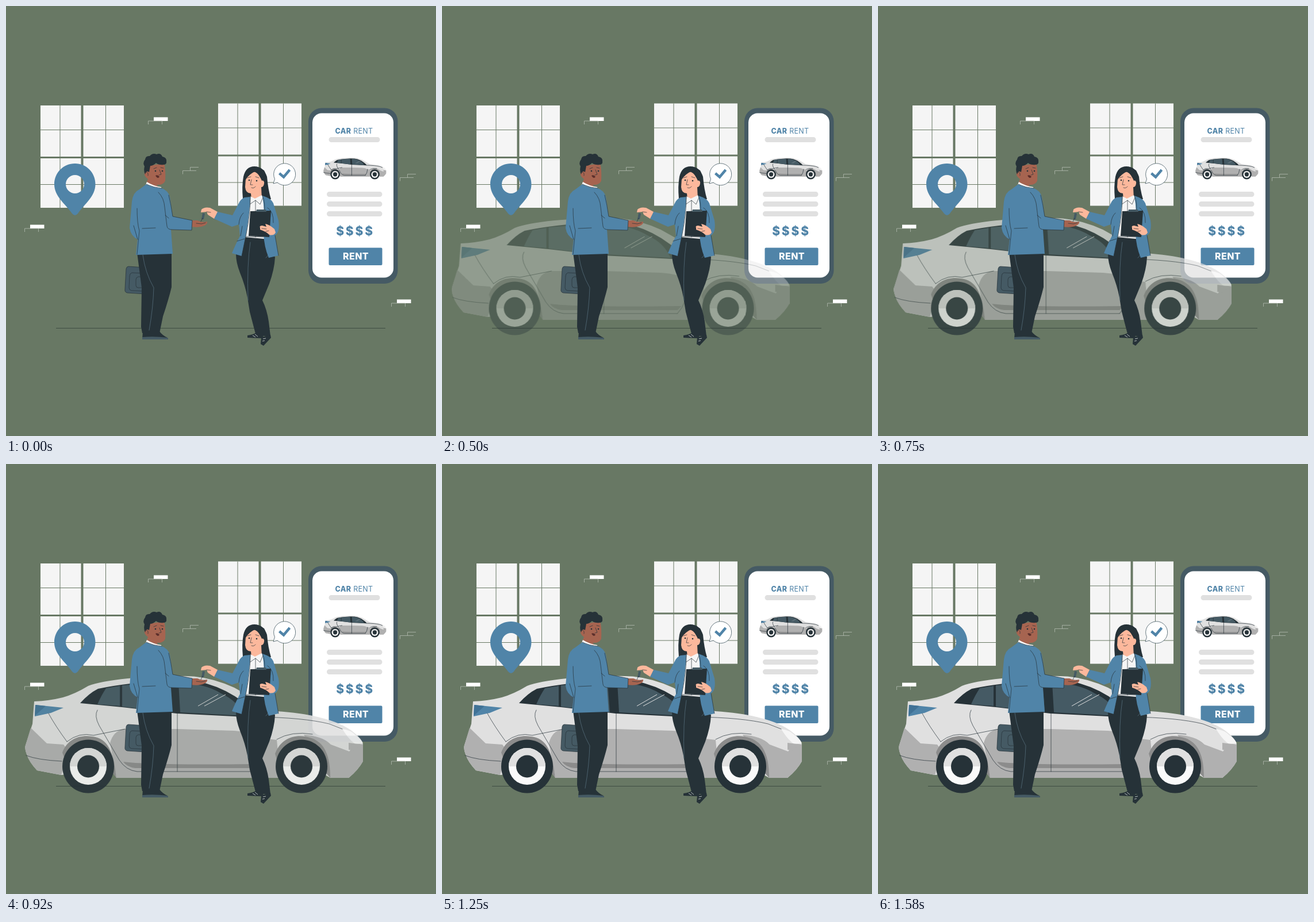
An HTML page without scripts that plays this animation: 748x748 px, repeating every 1.62 s.

```html
<!DOCTYPE html>
<html lang="en">
<head>
<meta charset="utf-8">
<title>Car rent</title>
<style>
  html, body { margin: 0; width: 100%; height: 100%; overflow: hidden; background: #687864; }
  svg { display: block; width: 100vw; height: 100vh; }
  .blue { fill: #5084a8; }
  .dark { fill: #263238; }
  .slate { fill: #455a64; }
  .white { fill: #fff; }
  .pale { fill: #e0e0e0; }
  .grey { fill: #b0b0b0; }
  .trim { fill: #8c8c8c; }
  .brown { fill: #a66450; }
  .peach { fill: #fcb89c; }
  .seam { fill: none; stroke: #263238; stroke-width: .7; stroke-linecap: round; stroke-linejoin: round; vector-effect: non-scaling-stroke; }
  .fold { stroke: #5b7583; }
  .brick { fill: none; stroke: #b3bcb0; stroke-width: .8; }
  text { font-family: Inter, "Open Sans", sans-serif; text-anchor: middle; }
  .bold { font-weight: 800; }

  .drive { animation: drive 1620ms infinite; }
  @keyframes drive {
    0%, 1.85% {
      opacity: 0;
      transform: translateX(-30px);
      animation-timing-function: cubic-bezier(.36, -.01, .5, 1.38);
    }
    94.44%, 100% { opacity: 1; transform: none; }
  }
</style>
</head>
<body>
<svg viewBox="0 0 748 748">
  <defs>
    <g id="window">
      <path fill="#f5f5f5" d="M60 173H130.500V262H60ZM134.500 173H205V262H134.500ZM60 265H130.500V351H60ZM134.500 265H205V351H134.500Z"/>
      <path fill="none" stroke="#687864" d="M94 173V351M173.500 173V351M60 215.500H205M60 310.500H205"/>
    </g>

    <g id="brick">
      <path class="white" d="M10 0H34.500V6.500H10Z"/>
      <path class="brick" d="M.5 12.500V6.500H24.500V12.500"/>
    </g>
    <path id="outline-brick" class="brick" d="M.5 12.500V6.500H24M13.500 6.500V.5H28"/>

    <g id="wheel">
      <ellipse class="dark" rx="45" ry="46.500"/>
      <circle r="32" fill="#fafafa"/>
      <path class="pale" d="M-32 0A32 32 0 0 1 32 0Z"/>
      <ellipse class="dark" rx="19" ry="19.500"/>
    </g>

    <g id="car">
      <path class="pale" d="M52 413Q78 412 102 406Q123 400 146 386Q166 378 215 373Q290 367 330 369.500Q365 373 400 389L473 430Q517 433 545 440Q588 450 608 467Q622 478 624 488V517Q616 532 599 546H567L540 530L474 546H195L185 530L99 541L57 533Q43 518 39 505Q35 495 37 489L49 452Z"/>
      <path class="grey" d="M46 459L74 486L103 488L112 500L99 541L57 533Q43 518 39 505Q35 495 37 489Z"/>
      <path class="grey" d="M184 485Q190 464 208 461H300L400 464Q431 466 449 477L474 480L480 546H195Z"/>
      <path class="grey" d="M521 471Q553 473 568 488L600 500L612 486L624 488V517Q616 532 599 546H567Z"/>
      <path fill="#f5f5f5" d="M588 461Q602 462 613 473Q622 480 624 486L611 487Q601 482 588 461Z"/>
      <path class="grey" d="M599 485L615 487L613 500L599 497Z"/>

      <path class="trim" d="M101 502C111 474 139 469 162 476C186 484 191 514 195 546L180 527H110Z"/>
      <path class="trim" d="M471 504C482 474 511 468 535 477C561 487 567 515 567 546L550 527H478Z"/>
      <path class="trim" d="M207 518Q250 524 430 522L436 522L429 529H228Q213 527 207 518Z"/>

      <path class="dark" d="M132 416Q147 399 163 391Q215 380 292 376Q333 376 352 382Q387 392 417 415Q441 431 440 441L300 434L205 423Z"/>
      <path class="slate" d="M162 418Q169 402 177 390L201 386V421ZM205 385L286 379L290 432L205 422ZM303 381Q348 381 377 399Q406 412 417 438L306 432Z"/>
      <path fill="none" stroke="#e0e0e0" d="M337 421L372 401M348 421L385 401"/>

      <path class="blue" d="M54 419L103 424L81 433L53 439Z"/>
      <path fill="#407296" d="M54 419L72 421L53 438Z"/>

      <path class="seam" d="M77 434Q89 456 109 483M38 507Q58 515 100 517M162 428Q156 438 165 455L200 515Q212 533 231 535H429M301 434V535M450 477Q447 516 429 535M109 483Q130 466 155 472L210 461M440 440Q520 441 565 452L588 461M474 479Q500 464 536 470"/>
      <use href="#wheel" x="146" y="526"/>
      <use href="#wheel" x="517" y="526"/>
    </g>
  </defs>

  <rect width="748" height="748" fill="#687864"/>

  <use href="#window"/>
  <use href="#window" x="309" y="-3.500"/>
  <use href="#brick" x="247" y="193.500"/>
  <use href="#brick" x="32" y="380.500"/>
  <use href="#brick" x="670" y="510.500"/>
  <use href="#outline-brick" x="307" y="280"/>
  <use href="#outline-brick" x="685" y="292"/>
  <path stroke="#35443c" stroke-width=".8" d="M87 560.500H660"/>

  <path class="blue" fill-rule="evenodd" d="M120 274C140 274 155.500 290 155.500 310C155.500 331 137 344 125 361Q120 367 115 361C103 344 84 331 84 310C84 290 100 274 120 274ZM120 294A16 16 0 1 0 120 326A16 16 0 1 0 120 294Z"/>

  <g id="phone">
    <rect class="slate" x="526" y="177.500" width="155.500" height="305.500" rx="23"/>
    <rect class="white" x="533" y="186.500" width="141" height="286" rx="16"/>
    <text class="blue" x="605.500" y="222" font-size="12.500" letter-spacing=".3"><tspan class="bold">CAR</tspan> RENT</text>
    <path stroke="#e0e0e0" stroke-width="9" stroke-linecap="round" d="M566 232.500H646M562.500 327.500H650M562.500 344.500H650M562.500 361.500H650"/>
    <use href="#car" transform="translate(545.500 195.400) scale(.1855)"/>
    <text class="blue bold" x="607.500" y="398.500" font-size="21" letter-spacing="2.800">$$$$</text>
    <rect class="blue" x="561.500" y="420.500" width="93" height="30.500" rx="2"/>
    <text class="white bold" x="608.500" y="440.500" font-size="16" letter-spacing=".4">RENT</text>
  </g>

  <g id="bubble">
    <path class="white" stroke="#455a64" stroke-width=".8" d="M465 309L467.500 301A19 19 0 1 1 472 307Z"/>
    <path fill="none" stroke="#5084a8" stroke-width="4.500" d="M475.500 291L483 297.500L493.500 285"/>
  </g>

  <g class="drive"><use href="#car"/></g>

  <g id="man">
    <path class="slate" stroke="#263238" stroke-width=".7" d="M213 453L242 455V501L211 499Q206 498 207 492L209 457Q210 453 213 453Z"/>
    <path class="seam" d="M240 465L219 464Q215 465 215 470L214 490Q214 494 218 495L240 496M240 471H230Q226 472 226 476V486Q226 490 230 490H240"/>

    <path class="dark" d="M228 429H288V489Q283 510 273 540L267 569H237L235 558L236 490Z"/>
    <path class="seam fold" d="M238 433Q242 464 257 490Q256 525 249 564"/>
    <path class="dark" d="M238 566H267Q272 573 281 577L282 580H237Z"/>
    <path class="slate" d="M237 576Q258 574 281 577L282 580H237Z"/>

    <path class="brown" d="M246 278L275 274Q278 284 277 304Q274 312 262 311L270 320L243 311L247 301Q239 296 241 288Z"/>
    <path class="dark" d="M242 293Q239 287 241 279Q237 273 242 267Q243 260 250 261Q255 255 262 258Q269 255 272 262Q280 264 279 270Q280 276 274 276Q266 277 261 273Q256 278 251 278L249 289Q244 285 242 293Z"/>
    <path class="seam" d="M257 283L262 281M269 281L274 282M267 285L270 293L266 294M244 289Q248 289 247 295"/>
    <g class="dark"><circle cx="260" cy="287" r="1.300"/><circle cx="272" cy="287" r="1.300"/></g>
    <path fill="#5c2f2b" d="M260 295Q264 293 267 297Q264 302 260 295Z"/>

    <path class="white" d="M245 306Q256 313 270 315L271 320L243 311Z"/>
    <path class="brown" d="M322 373L333 373Q340 377 350 375Q351 379 345 382Q336 386 322 384Z"/>
    <path class="seam" d="M331 378L340 379L347 377"/>
    <path class="blue" d="M244 310Q257 316 271 317Q282 321 285 332L290 366L324 373L323 390L287 389L290 431L226 433L229 406Q217 400 215 386L219 340Q221 324 232 319Z"/>
    <path class="seam" d="M265 324Q275 334 276 350L280 383Q281 389 289 389L323 390L324 373L290 366Q287 345 283 329M237 387L260 386M228 352Q228 378 232 391L228 432M222 382L229 406M244 310Q257 316 271 317M277 364L283 369"/>
  </g>

  <g id="woman">
    <path class="dark" d="M412 335Q410 313 413 297Q417 279 432 279Q448 279 454 297Q456 320 461 336L440 341Z"/>
    <path class="dark" d="M415 402L452 404L468 437Q467 458 458 483L446 512Q454 528 457 549L460 574H435L424 532L420 507Q416 486 407 464Q400 446 400 431Z"/>
    <path class="seam fold" d="M425 411Q419 450 421 512M452 438Q457 435 459 424"/>
    <path class="dark" d="M420 573Q429 572 436 568L449 572L445 578L420 577ZM444 576L460 572L461 577L448 591L443 588Z"/>
    <path fill="none" stroke="#d8dede" stroke-width=".8" d="M429 573L434 576M433 571L438 575M447 579L452 578M446 583L450 582"/>

    <path class="peach" d="M417 300Q420 290 436 288L445 303Q450 304 449 309Q448 315 444 315L445 336L427 337L426 326Q417 326 416 315Z"/>
    <path class="dark" d="M414 309Q417 297 432 288Q442 293 445 304Q456 299 449 286L438 280L422 283Q413 290 414 309Z"/>
    <path class="seam" d="M420 299L426 297M434 297L440 299M427 302L425 311L429 311M427 316Q431 318 434 314"/>
    <g class="dark"><circle cx="423" cy="303" r="1.300"/><circle cx="436" cy="304" r="1.300"/></g>

    <path fill="#f5f5f5" d="M425 331L433 335L445 329L453 345L449 405L415 402L418 348Z"/>
    <path class="seam" d="M425 331L424 345L434 338L442 345L447 333M434 338L434 402M416 401L448 402"/>

    <path class="blue" d="M425 332L415 333Q408 336 405 343L394 364L368 358L362 370L393 384L405 380L407 400Q400 413 393 430L410 435L418 396Q424 360 425 332Z"/>
    <path class="blue" d="M446 330Q462 335 465 343L474 373Q477 393 468 399L474 434L457 438Q449 419 448 396Q451 360 446 330Z"/>
    <path class="seam" d="M425 332Q425 362 418 396L410 435M405 380Q406 366 413 360M408 400L411 383M446 330Q452 344 449 359M455 351Q466 358 465 377M468 399L474 434M415 405L402 409"/>

    <path class="peach" d="M368 358L355 351Q345 349 340 354L339 359L349 358L351 363L362 370Z"/>
    <path class="slate" d="M342 360L346 361L344 371L340 371Z"/>
    <path class="seam" d="M349 358L356 359M342 369L339 375"/>

    <path class="dark" d="M425 357L461 356L458 402L422 400Z"/>
    <path class="slate" d="M436 354H452L453 358H435Z"/>
    <path class="peach" d="M442 386Q440 382 446 382L453 384L451 379Q458 380 467 388L469 394Q466 400 458 398Q452 392 442 389Z"/>
    <path class="seam" d="M445 387L453 388M452 392L457 391"/>
  </g>
</svg>
</body>
</html>
```
